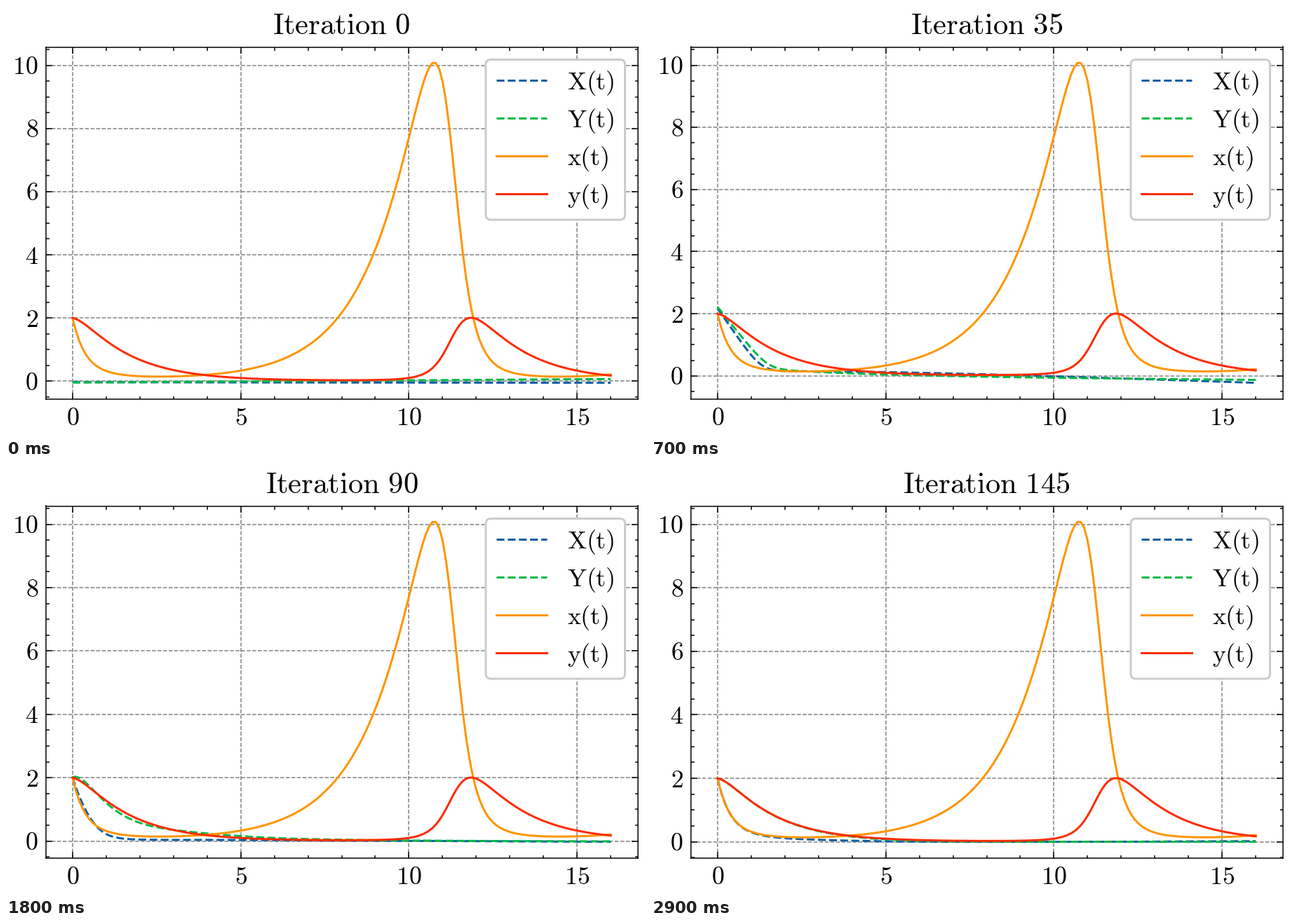
Recreate the animation shown at these times as a matplotlib script. Size 911 px wide and 615 px high, loop 3 s.

```python
import numpy as np
import matplotlib.pyplot as plt
from matplotlib.animation import FuncAnimation
from matplotlib.patches import FancyBboxPatch

W, H, DPI = 911, 615, 144
PT = 72 / DPI                                  # points per pixel
LEFT, RIGHT, TOP, BOTTOM = 56.5, 900.5, 58.5, 560.5
FRAMES, STEP = 30, 5
BLUE, GREEN, ORANGE, RED = "#0C5DA5", "#00B945", "#FF9500", "#FF2C00"
FONT = 36 * PT
LINE = 3 * PT
THIN = 1.5 * PT

plt.rcParams["mathtext.fontset"] = "cm"


def roman(text):
    return r"$\mathrm{%s}$" % text.replace(" ", r"\ ")


# Predator and prey solution
def rate(s):
    x, y = s
    return np.array([x * (0.7 - 1.509 * y), y * (0.3 * x - 0.7)])


def solve(t, crest=10.75, h=0.005, end=20):
    """Runge-Kutta orbit, with time scaled so that the prey crest is at `crest`."""
    grid = np.arange(0, end, h)
    path = np.empty((len(grid), 2))
    s = np.array([2.0, 2.0])
    for i in range(len(grid)):
        path[i] = s
        k1 = rate(s)
        k2 = rate(s + h / 2 * k1)
        k3 = rate(s + h / 2 * k2)
        k4 = rate(s + h * k3)
        s = s + h / 6 * (k1 + 2 * k2 + 2 * k3 + k4)
    speed = grid[path[:, 0].argmax()] / crest
    return [np.interp(t * speed, grid, path[:, j]) for j in (0, 1)]


t = np.linspace(0, 16, 161)
x, y = solve(t)


# Network estimates at a few training stages
def ramp(height, knee, sharp):
    """Straight fall from `height` that bends smoothly to zero at the knee."""
    soft = np.log1p(np.exp(sharp * (knee - t)))
    return height * soft / soft[0]


def decay(height, width, power):
    return height * np.exp(-(t / width) ** power)


def tail(height, base, slope):
    return height * np.exp(-t / 3.5) + base + slope * t


def bump(height, center, width):
    return height * np.exp(-((t - center) / width) ** 2)


x_end = x * np.exp(-(t / 3.2) ** 2.5)
y_end = y * np.exp(-(t / 7) ** 4)
wobble = 0.9 * t * (1.1 - t) * np.exp(-2 * t)

stages = np.array([0, 10, 35, 55, 75, 110, 145])
x_keys = np.array([
    tail(0, -0.035, -0.0012),
    ramp(0.955, 2.45, 1.4) + tail(0, 0.03, -0.03),
    ramp(2.07, 1.3, 5) + tail(-0.27, 0.37, -0.037),
    ramp(1.90, 0.9, 4) + tail(-0.18, 0.203, -0.0158),
    ramp(2.04, 0.75, 4) + tail(-0.17, 0.13, -0.0105),
    x_end + bump(0.03, 5, 2),
    x_end + bump(0.02, 16, 3),
])
y_keys = np.array([
    tail(0, -0.045, 0.007),
    ramp(0.795, 2.7, 1.2) + tail(0, -0.05, 0),
    ramp(1.88, 1.5, 5) + tail(0.33, 0.01, -0.009),
    ramp(1.13, 1.3, 5) + tail(0.78, -0.06, 0),
    decay(1.18, 1.06, 1.8) + tail(0.85, -0.03, 0),
    y_end + wobble + bump(0.05, 4, 1.5),
    y_end,
])


def between(keys, n):
    """Cubic Hermite blend of the stage curves at iteration n."""
    slopes = np.gradient(keys, stages, axis=0)
    i = min(np.searchsorted(stages, n, side="right") - 1, len(stages) - 2)
    gap = stages[i + 1] - stages[i]
    u = (n - stages[i]) / gap
    rise = u * u * (3 - 2 * u)
    return ((1 - rise) * keys[i] + rise * keys[i + 1]
            + gap * u * (1 - u) * ((1 - u) * slopes[i] - u * slopes[i + 1]))


# Plot
fig = plt.figure(figsize=(W / DPI, H / DPI), dpi=DPI, facecolor="white")
ax = fig.add_axes([LEFT / W, 1 - BOTTOM / H, (RIGHT - LEFT) / W, (BOTTOM - TOP) / H])
for spine in ax.spines.values():
    spine.set_linewidth(THIN)

x_ticks, y_ticks = range(0, 16, 5), range(0, 11, 2)
ax.set_xticks(x_ticks)
ax.set_yticks(y_ticks)
ax.set_xticks(np.arange(0, 17), minor=True)
ax.set_yticks(np.arange(-0.5, 10.6, 0.5), minor=True)
ax.tick_params(which="both", direction="in", top=True, right=True, width=THIN,
               labelbottom=False, labelleft=False)
ax.tick_params(which="major", length=9 * PT)
ax.tick_params(which="minor", length=4.5 * PT)
ax.grid(True, color="k", alpha=0.5, linestyle="--", linewidth=THIN)
ax.set_xlim(-0.8, 16.8)


def tick_label(value, at, coords, dx, dy, ha):
    ax.annotate(roman(str(value)), at, xycoords=coords, xytext=(dx * PT, dy * PT),
                textcoords="offset points", ha=ha, va="baseline", fontsize=FONT)


for v in x_ticks:
    tick_label(v, (v, 0), ax.get_xaxis_transform(), 0, -37, "center")
for v in y_ticks:
    tick_label(v, (0, v), ax.get_yaxis_transform(), -10.5, -12.5, "right")

x_line, = ax.plot(t, x, "--", color=BLUE, lw=LINE)
y_line, = ax.plot(t, y, "--", color=GREEN, lw=LINE)
ax.plot(t, x, color=ORANGE, lw=LINE)
ax.plot(t, y, color=RED, lw=LINE)
title = ax.set_title("", fontsize=42.7 * PT, pad=18 * PT)

# Legend, laid out in pixels
key = fig.add_axes([0, 0, 1, 1])
key.set_xlim(0, W)
key.set_ylim(H, 0)
key.axis("off")
key.add_patch(FancyBboxPatch((684, 76.5), 198.5, 228.5,
                             boxstyle="round,pad=0,rounding_size=7.2",
                             facecolor="white", edgecolor="0.8", linewidth=LINE))
rows = [("X(t)", BLUE, "--"), ("Y(t)", GREEN, "--"), ("x(t)", ORANGE, "-"), ("y(t)", RED, "-")]
for i, (name, color, style) in enumerate(rows):
    level = 106 + 54.1 * i
    key.plot([699, 771], [level, level], style, color=color, lw=LINE)
    key.text(800, level + 12.6, roman(name), fontsize=FONT, va="baseline")


def draw(frame):
    n = frame * STEP
    xs, ys = between(x_keys, n), between(y_keys, n)
    x_line.set_ydata(xs)
    y_line.set_ydata(ys)
    low = min(xs.min(), ys.min(), y.min())
    high = x.max()
    margin = 0.05 * (high - low)
    ax.set_ylim(low - margin, high + margin)
    title.set_text(roman(f"Iteration {n}"))
    return x_line, y_line, title


anim = FuncAnimation(fig, draw, frames=FRAMES, interval=100, repeat=True)
plt.show()
```
